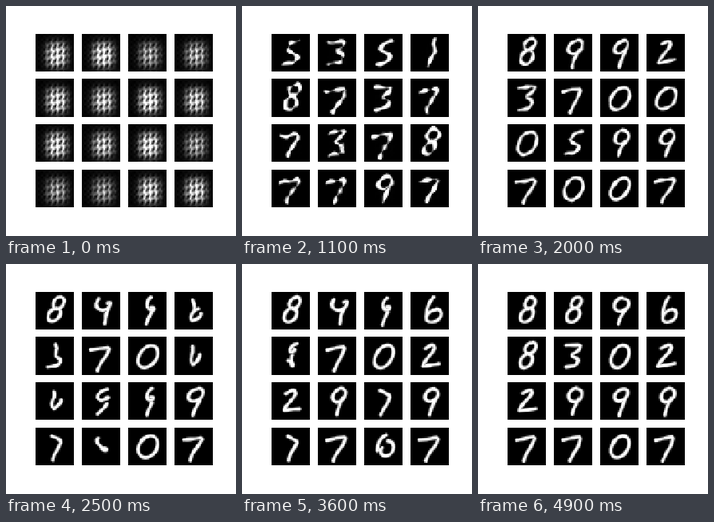
A matplotlib script that plays this animation: 288 px wide and 288 px high, repeating every 5000 ms.

```python
import matplotlib.pyplot as plt
import numpy as np
from matplotlib.animation import FuncAnimation

FRAMES, INTERVAL = 50, 100
SIZE, SAMPLES, START = 28, 120, 6

# What the sixteen tiles resemble as training goes on: digits, or
# '=' and '#' for two and three bare diagonal strokes.
MOMENTS = {6: '=#0##=30##3==0##', 11: '5351873773787797', 20: '8992370005997007',
           30: '8416570229191707', 42: '8996870229797767', 49: '8896830229997707'}

Y, X = np.mgrid[:SIZE, :SIZE].astype(float)


def ring(cx, cy, rx, ry, lean=0.3):
    a = np.linspace(0, 2 * np.pi, 25)
    dy = -ry * np.cos(a)
    return np.column_stack([cx - rx * np.sin(a) - lean * dy, cy + dy])


def line(*xy):
    """Polyline with its corners cut once."""
    p = np.reshape(xy, (-1, 2)).astype(float)
    a, b = p[:-1], p[1:]
    cut = np.stack([.8 * a + .2 * b, .2 * a + .8 * b], 1).reshape(-1, 2)
    return np.vstack([p[:1], cut, p[-1:]])


def stripes(count):
    return [line(6, y + 3, 13, y, 17, y - 2, 21, y - 5)
            for y in np.linspace(9, 19, count)]


GLYPHS = {
    '0': [ring(14, 14, 6.5, 8)],
    '1': [line(17, 4, 17, 11, 13, 24)],
    '2': [line(10, 8, 16, 5, 18, 9, 7, 21, 13, 20, 20, 19)],
    '3': [line(8, 6, 19, 5, 18, 9, 12, 13, 18, 16, 16, 21, 8, 22)],
    '4': [line(7, 6, 9, 12, 19, 12, 22, 5, 18, 16, 19, 23)],
    '5': [line(20, 5, 14, 7, 11, 12, 19, 16, 16, 21, 8, 22)],
    '6': [line(16, 4, 12, 10, 11, 18), ring(16.5, 17.5, 5, 4.5)],
    '7': [line(6, 9, 12, 8, 20, 7, 17, 14, 13, 19, 11, 24)],
    '8': [ring(16, 8, 3.8, 4.2), ring(13.5, 17, 4.3, 5)],
    '9': [ring(15, 9.5, 4.8, 4.8), line(18, 12, 15, 18, 13, 24)],
    '=': stripes(2),
    '#': stripes(3),
}


def sample(strokes):
    """Spread points evenly over all strokes of a glyph."""
    lengths, total = [], 0
    for stroke in strokes:
        steps = np.hypot(*np.diff(stroke, axis=0).T)
        lengths.append(total + np.r_[0, np.cumsum(steps)])
        total = lengths[-1][-1]
    points, along = np.vstack(strokes), np.concatenate(lengths)
    s = (np.arange(SAMPLES) + .5) / SAMPLES * total
    return np.column_stack([np.interp(s, along, points[:, k]) for k in (0, 1)])


POINTS = {name: sample(strokes) for name, strokes in GLYPHS.items()}
TIMES = list(MOMENTS)


def pose(index, frame):
    """Points of a tile, eased between the two nearest moments."""
    k = int(np.clip(np.searchsorted(TIMES, frame, 'right') - 1, 0, len(TIMES) - 2))
    a, b = TIMES[k:k + 2]
    u = np.clip((frame - a) / (b - a), 0, 1)
    u = u * u * (3 - 2 * u)
    return (1 - u) * POINTS[MOMENTS[a][index]] + u * POINTS[MOMENTS[b][index]]


def bump(frame, centre, width):
    return np.exp(-((frame - centre) / width) ** 2)


def lattice(glow):
    """Blob with the regular ripple of an untrained network."""
    blob = np.exp(-np.abs((X - 15) / 7.5) ** 3 - np.abs((Y - 15.5) / 9) ** 3)
    ripple = .3 * np.cos(np.pi * X / 2 + .5) + .28 * np.cos(
        np.pi * (Y + 2 * (X // 4 % 2)) / 2.5 + X)
    faint = .06 * (1 + np.cos(np.pi * X / 2) * np.cos(np.pi * Y / 2))
    edge = np.exp(-((X - 14) ** 2 + (Y - 15) ** 2) / 180)
    return np.clip(glow * blob * (.6 + ripple) + faint * edge, 0, 1)


def render(index, frame):
    rng = np.random.default_rng(100 + index)
    glow = rng.uniform(.7, 1.35)
    phase = rng.uniform(0, 2 * np.pi, 4) + frame * rng.uniform(.3, .8, 4)
    waves = rng.uniform(.4, .8, 2)

    # Strokes lean heavily at first; every epoch sways them a little.
    s = np.linspace(0, 2 * np.pi, SAMPLES)[:, None]
    points = pose(index, frame) + .4 * np.sin(s + phase[:2])
    points[:, 1] -= .25 * bump(frame, START, 3) * (points[:, 0] - 14)

    dist = np.sqrt(((X[..., None] - points[:, 0]) ** 2
                    + (Y[..., None] - points[:, 1]) ** 2).min(-1))
    patches = .3 + .7 * np.sin(waves[0] * X + phase[2]) * np.sin(waves[1] * Y + phase[3])
    rough = .3 + 1.2 * bump(frame, 10, 9)
    radius = 1.3 + .6 * bump(frame, START, 4)
    image = np.clip((radius + .65 - dist - rough * patches) / 1.2, 0, 1)
    image /= max(image.max(), .1)

    grid = lattice(glow)
    w = min(frame / START, 1) ** 1.5
    haze = .15 * bump(max(frame, START), START, 3)
    return (1 - w) * grid + w * np.maximum(image, haze * grid)


fig, axes = plt.subplots(4, 4, figsize=(4, 4), dpi=72, facecolor='white')
fig.subplots_adjust(left=.125, right=.9, bottom=.125, top=.88,
                    wspace=.2, hspace=.2)
images = []
for ax in axes.flat:
    images.append(ax.imshow(np.zeros((SIZE, SIZE)), cmap='gray', vmin=0, vmax=1,
                            interpolation='nearest'))
    ax.axis('off')


def update(frame):
    for index, image in enumerate(images):
        image.set_data(render(index, frame))
    return images


animation = FuncAnimation(fig, update, frames=FRAMES, interval=INTERVAL,
                          repeat=True, repeat_delay=0, blit=False)
plt.show()
```
